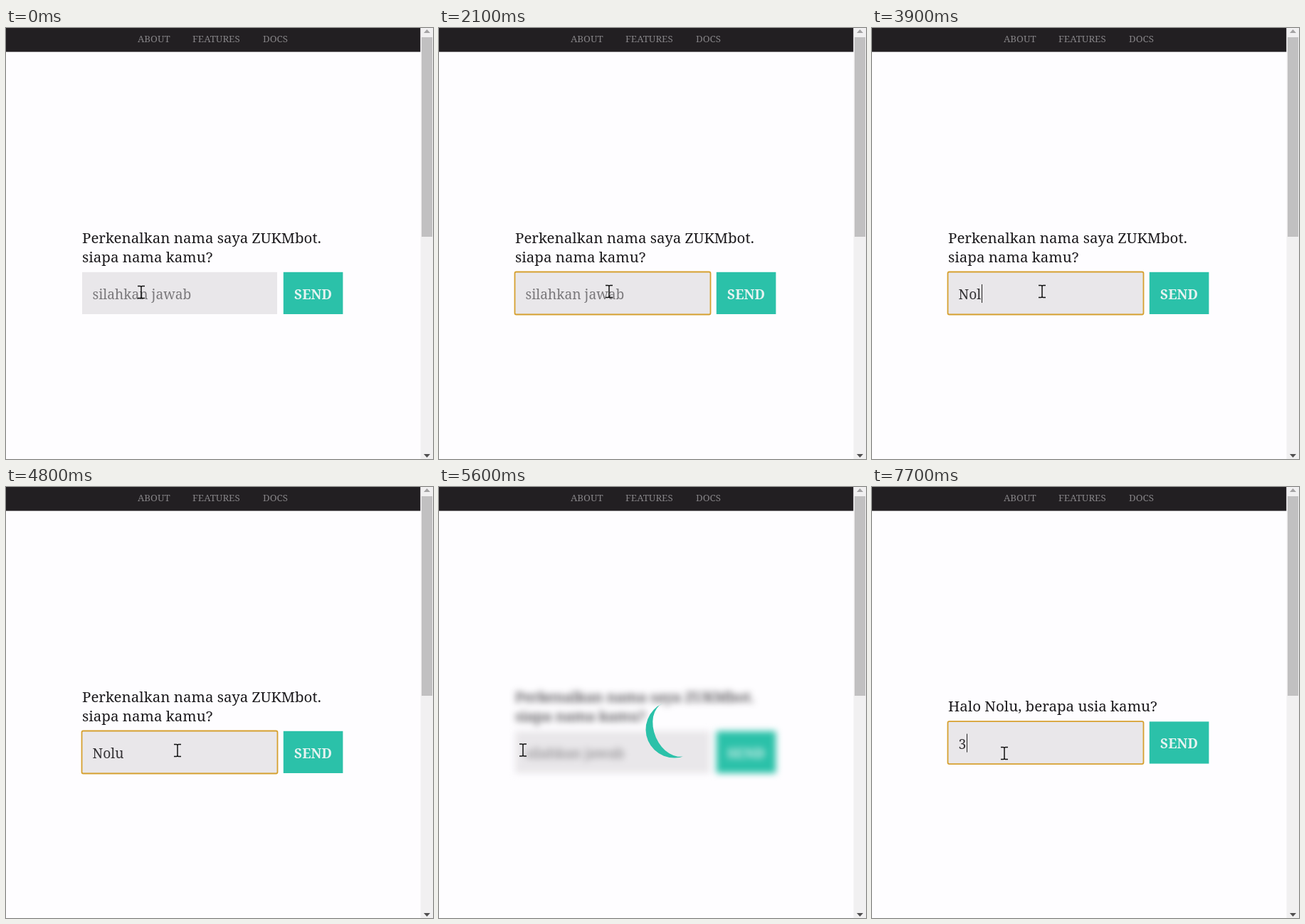
An HTML page that plays this animation: 600x607 px, repeating every 8000 ms.

```html
<!DOCTYPE html>
<html lang="id">
<head>
<meta charset="utf-8">
<style>
  html, body { margin: 0; width: 100%; height: 100%; overflow: hidden; background: #fefdff; }
  svg { display: block; }
  text { font-family: "Noto Serif", Cambria, serif; white-space: pre; }
  .nav { font-size: 13.3px; fill: #858386; }
  .ask { font-size: 20.5px; fill: #1c1a1d; }
  .field { font-size: 19.2px; }
  .send { font-size: 18.9px; font-weight: 700; fill: #e6f3f1; }
</style>
</head>
<body>
<svg width="600" height="607" viewBox="0 0 600 607">
  <rect width="600" height="607" fill="#fefdff"/>
  <rect width="582.5" height="33.6" fill="#221f22"/>
  <g class="nav">
    <text x="185" y="20">ABOUT</text>
    <text x="262" y="20">FEATURES</text>
    <text x="361" y="20">DOCS</text>
  </g>

  <rect x="582.5" width="17.5" height="607" fill="#f1f0f1"/>
  <rect x="584" y="13" width="15" height="281" fill="#c1c0c1"/>
  <path d="M587 7h9l-4.5-5z" fill="#a3a2a3"/>
  <path d="M587 600h9l-4.5 5z" fill="#504f50"/>

  <g id="form">
    <text class="ask" id="line1" x="107"/>
    <text class="ask" id="line2" x="107" y="330"/>
    <g id="row">
      <rect x="107" y="343.8" width="274" height="59.2" fill="#e9e7ea"/>
      <rect id="ring" x="106.5" y="343.5" width="275" height="60" rx="2" fill="none" stroke="#d6a02f" stroke-width="1.8"/>
      <text class="field" id="answer" x="121.5" y="382"/>
      <path id="caret" d="M0 361v26" stroke="#222" stroke-width="1"/>
      <rect x="389.8" y="343.8" width="83.6" height="59.2" fill="#2bc1a9"/>
      <text class="send" x="431.5" y="381.5" text-anchor="middle">SEND</text>
    </g>
  </g>

  <path id="loader" d="M0-40A40 40 0 0 0 0 40A28 40 0 0 1 0-40" fill="#2bc1a9"/>
  <path id="pointer" d="M-5-8.5h3.5q1.5 0 1.5 1.5V7q0 1.5-1.5 1.5H-5M5-8.5H1.5Q0-8.5 0-7V7q0 1.5 1.5 1.5H5" fill="none" stroke="#111" stroke-width="1.5"/>
</svg>
<script>
const LOOP = 8000;
const el = id => document.getElementById(id);
const [form, row, line1, line2, ring, answer, caret, loader, pointer] =
  ['form', 'row', 'line1', 'line2', 'ring', 'answer', 'caret', 'loader', 'pointer'].map(el);
const within = (t, a, b) => t >= a && t < b;
const show = (node, on) => node.setAttribute('visibility', on ? 'visible' : 'hidden');

// [time, x, y]
const route = [
  [1300, 190, 372], [2000, 239, 371], [4000, 239, 371], [4400, 241, 371],
  [4900, 241, 371], [5400, 118, 370.5], [6700, 118, 370.5], [7100, 186, 375]
];
// [time, typed text]; each entry restarts the caret blink
const keys = [
  [1500, ''], [2600, 'N'], [2900, 'No'], [3500, 'Nol'], [4100, 'Nolu'],
  [4900, ''], [6900, ''], [7700, '3']
];

function pointerAt(t) {
  const i = route.findIndex(p => p[0] > t);
  if (i === 0) return route[0].slice(1);
  if (i < 0) return route[route.length - 1].slice(1);
  const [a, b] = [route[i - 1], route[i]];
  const k = (t - a[0]) / (b[0] - a[0]), ease = k * k * (3 - 2 * k);
  return [1, 2].map(j => a[j] + (b[j] - a[j]) * ease);
}

function draw(t) {
  const second = t >= 5950;
  const loading = within(t, 5000, 5950);
  const focused = within(t, 1500, 4900) || t >= 6900;
  const [since, typed] = keys.filter(k => k[0] <= t).pop() || [0, ''];

  line1.textContent = second ? 'Halo Nolu, berapa usia kamu?' : 'Perkenalkan nama saya ZUKMbot.';
  line1.setAttribute('y', second ? 316 : 303);
  line2.textContent = second ? '' : 'siapa nama kamu?';
  row.setAttribute('transform', `translate(0 ${second ? -13.4 : 0})`);

  answer.textContent = typed || 'silahkan jawab';
  answer.setAttribute('fill', typed ? '#333134' : '#7a787b');
  show(ring, focused);
  const blinkOn = t >= 6900 || (t - since) % 1000 < 500;
  show(caret, focused && blinkOn);
  const caretX = 122 + (typed ? answer.getComputedTextLength() : 0);
  caret.setAttribute('transform', `translate(${Math.round(caretX) + 0.5} 0)`);

  const blur = loading ? 4.6 * Math.min(1, (t - 4950) / 250) : 0;
  form.style.filter = blur ? `blur(${blur}px)` : 'none';
  show(loader, loading);
  loader.setAttribute('transform', `translate(330.5 341.5) rotate(${(t - 5600) * 0.36 - 24})`);

  pointer.setAttribute('transform', `translate(${pointerAt(t)})`);
}

const start = performance.now();
function tick() {
  draw((performance.now() - start) % LOOP);
  requestAnimationFrame(tick);
}
tick();
</script>
</body>
</html>
```
